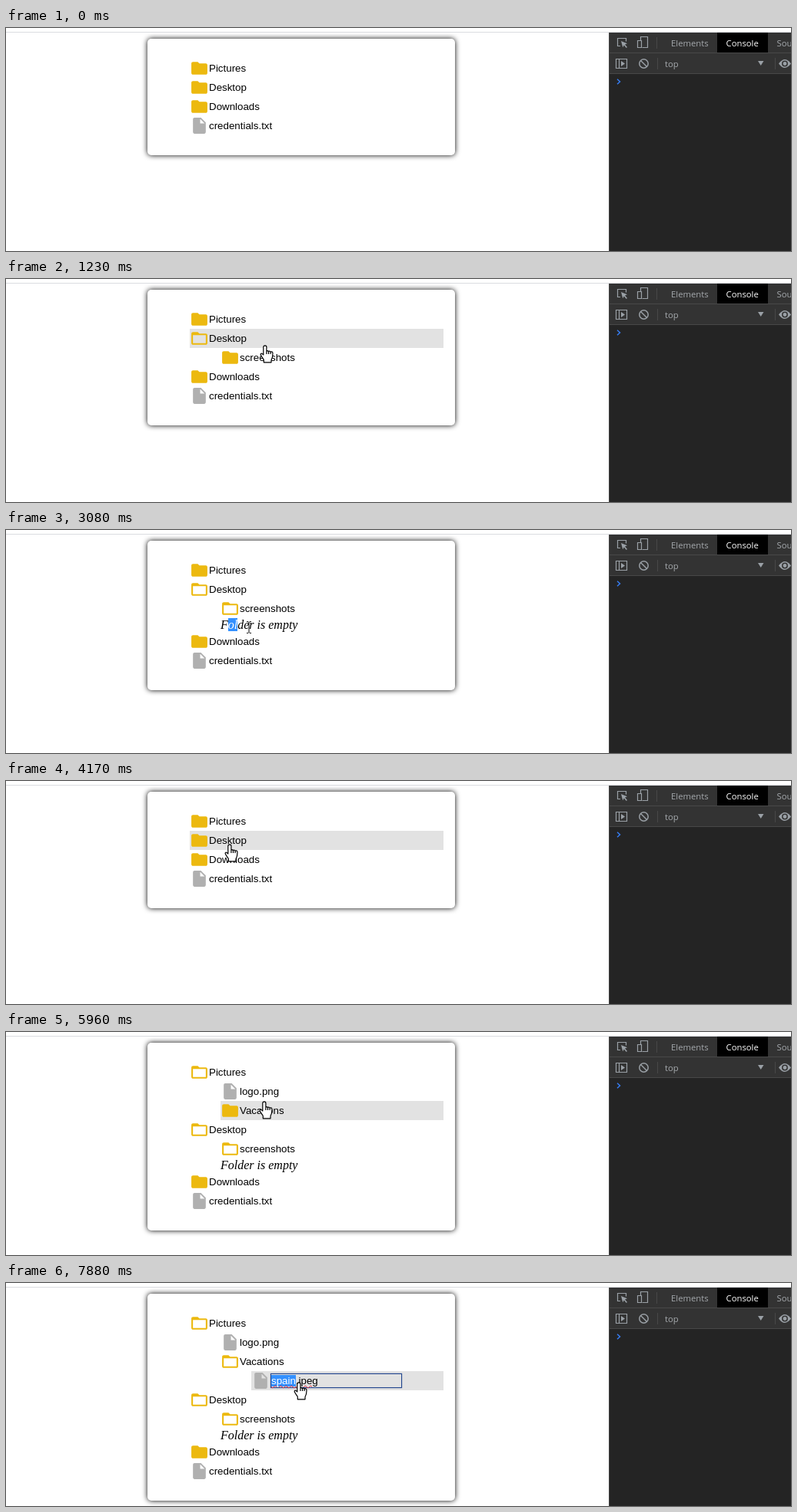
Animation of 1021x291 px, one loop 8000 ms. Source, as an HTML page:

```html
<!DOCTYPE html>
<html lang="en">
<head>
<meta charset="utf-8">
<title>File tree</title>
<style>
html, body { margin: 0; width: 100%; height: 100%; overflow: hidden; background: #fff; }
body { position: relative; font: 13.333px/25px "Liberation Sans", Arial, sans-serif; color: #000; }
[hidden] { display: none !important; }
.rule { position: absolute; top: 5px; left: 0; width: 100%; height: 1px; background: #dadce0; }
.card { position: absolute; left: 184px; top: 14px; width: 400px; box-sizing: border-box;
  padding: 26px 15px 26px 55px; border-radius: 5px; background: #fff; box-shadow: 0 0 7px #000; }
.kids { padding-left: 40px; }
.row { position: relative; height: 25px; white-space: nowrap; }
.row.hover { background: #e2e2e2; }
.row svg { position: absolute; left: 0; top: 0; width: 25px; height: 25px; }
.row .label { position: absolute; left: 25px; top: 0; }
.folder { fill: #ecb90f; }
.file { fill: #b0b0b0; }
.empty { height: 18px; font: italic 16px/18px "Liberation Serif", "Times New Roman", serif; }
.empty span { display: inline-block; height: 18px; width: max-content; }
.sel { background: #3390ff; color: #fff; }
.field { position: absolute; left: 25px; top: 3px; width: 171px; height: 19px; box-sizing: border-box;
  border: 1px solid #24478f; box-shadow: 0 0 1px #24478f; line-height: 17px; }
.field u { text-decoration: underline wavy #e0202f 1px; text-underline-offset: 1px; }
.menu { position: absolute; left: 348px; top: 112px; width: 96px; height: 63px; box-sizing: border-box;
  padding: 5px; border-radius: 5px; background: #fff; box-shadow: 0 0 7px #000; }
.menu .row { height: 26.5px; line-height: 26px; padding-left: 8px; }
.tools { position: absolute; left: 784px; top: 6px; width: 237px; height: 285px; }
.tools text { font: 11.3px "Open Sans", "Noto Sans", sans-serif; fill: #a5a9ad; }
.pointer { position: absolute; left: 0; top: 0; width: 20px; height: 26px; overflow: visible; }
.pointer path { fill: #fff; stroke: #000; stroke-linejoin: round; }
#beam path { fill: none; }
</style>
</head>
<body>
<div class="rule"></div>
<div class="card" id="card"></div>
<div class="menu" id="menu"><div class="row">Rename</div><div class="row">Delete</div></div>

<svg class="tools" viewBox="784 6 237 285">
  <path fill="#242424" d="M784 6h237v285H784z"/>
  <path fill="#333" d="M785 6h236v53H785z"/>
  <path fill="#000" d="M925 6h66v26h-66z"/>
  <path stroke="#484848" fill="none" d="M785 32.5h236M785 59.5h236M846.5 12v15M847.5 39v15M1000.5 39v15M784.5 6v285"/>
  <g fill="none" stroke="#9aa0a6" stroke-width="1.2">
    <path d="M799 23.5h-3.5v-10h11v4"/>
    <path fill="#9aa0a6" stroke="none" d="M800 17l8 3.2-3 1.4 3 3.4-1.2 1-3-3.4-1.6 2.6z"/>
    <path d="M825.5 16v-4.5h9v14h-7M821.500 16.500h5v9h-5z"/>
    <path d="M793.500 40.500h14v12h-14zM797.500 40.500v12"/>
    <path fill="#9aa0a6" stroke="none" d="M800 43l5 3.500-5 3.500z"/>
    <circle cx="829.500" cy="46.500" r="5.700" stroke-width="1.500"/>
    <path stroke-width="1.500" d="M825.500 42.500l8 8"/>
  </g>
  <path fill="#9aa0a6" d="M978 43h7.500l-3.750 6z"/>
  <path fill="#9aa0a6" d="M1005 46.500q8-11 16 0q-8 11-16 0z"/>
  <circle cx="1013" cy="46.500" r="3.200" fill="#9aa0a6" stroke="#333" stroke-width="1.500"/>
  <path fill="none" stroke="#367cf1" stroke-width="1.500" d="M795 66.800l3.500 3.200-3.500 3.200"/>
  <text x="865" y="24">Elements</text>
  <text x="936.500" y="24" style="fill:#fff">Console</text>
  <text x="1002.500" y="24">Sources</text>
  <text x="857" y="51">top</text>
</svg>

<svg class="pointer" id="arrow"><path d="M.5 .5V16.500L4.200 13 6.800 19 9.200 18 6.600 12.200H11.800Z"/></svg>
<svg class="pointer" id="hand"><g transform="translate(-6.500 -1)"><path stroke-width="1.200" d="M6.500 .8C5 .8 4.300 1.600 4.300 3V13L2.800 11.600C1.800 10.700 .6 11.200 .6 12.400 1 14.500 3 16.500 4.800 19.500V22.800H14.500V19.800C15.800 17.500 16.400 15.500 16.400 12.500V10.400C16.400 8.600 14 8.400 13.600 9.600 13.400 8 11 7.600 10.800 9 10.500 7.400 8.600 7.200 8.400 8.500V3C8.400 1.600 8 .8 6.500 .8ZM8.400 8.500V12M11 9V12M13.600 9.600V12"/></g></svg>
<svg class="pointer" id="beam"><path d="M-3-7.500H-1L0-6.500 1-7.500H3M0-6.500V6.500M-3 7.500H-1L0 6.500 1 7.500H3"/></svg>

<script>
const LOOP = 8000, STEP = 77.2;
const $ = id => document.getElementById(id);

const shapes = {
  closed: 'M10 4H4c-1.100 0-2 .9-2 2v12c0 1.100.9 2 2 2h16c1.100 0 2-.9 2-2V8c0-1.100-.9-2-2-2h-8l-2-2z',
  open: 'M20 6h-8l-2-2H4c-1.100 0-2 .9-2 2v12c0 1.100.9 2 2 2h16c1.100 0 2-.9 2-2V8c0-1.100-.9-2-2-2zm0 12H4V8h16v10z',
  file: 'M6 2c-1.100 0-2 .9-2 2v16c0 1.100.9 2 2 2h12c1.100 0 2-.9 2-2V8l-6-6H6zm7 7V3.500L18.500 9H13z'
};

const tree = [
  ['Pictures', [['logo.png'], ['Vacations', [['spain.jpeg']]]]],
  ['Desktop', [['screenshots', []]]],
  ['Downloads', []],
  ['credentials.txt']
];

// When each folder is open, as [from, to) spans
const openSpans = {
  Pictures: [[5270, LOOP]],
  Vacations: [[6200, LOOP]],
  Desktop: [[950, 4100], [4560, LOOP]],
  screenshots: [[1550, LOOP]],
  Downloads: []
};

// Pointer stops: time, x, y
const stops = [
  [70, 744, 244], [400, 545, 148], [760, 344, 78], [830, 337, 73], [1150, 337, 73],
  [1225, 337, 87], [1375, 335, 105], [1800, 335, 105], [2300, 284, 122],
  [2380, 278, 121], [2600, 289, 122], [2800, 301, 124], [3070, 316, 127],
  [3160, 316, 127], [3230, 321, 130], [3380, 305, 122], [3640, 305, 122],
  [4000, 291, 83], [4240, 291, 83], [4480, 301, 76], [4880, 301, 76],
  [4950, 301, 66], [5050, 301, 66], [5260, 310, 54], [5580, 310, 54],
  [5930, 336, 91], [6100, 337, 98], [6340, 337, 98], [6790, 352, 117],
  [7260, 352, 117], [7640, 381, 130]
];

const within = (t, spans) => spans.some(([a, b]) => t >= a && t < b);

function add(parent, cls, html = '') {
  const el = document.createElement('div');
  el.className = cls;
  el.innerHTML = html;
  return parent.appendChild(el);
}

const folders = [];
function build(parent, nodes) {
  for (const [name, kids] of nodes) {
    const row = add(parent, 'row',
      `<svg viewBox="0 0 24 24" class="${kids ? 'folder' : 'file'}"><path d="${shapes[kids ? 'closed' : 'file']}"/></svg>` +
      `<span class="label">${name}</span>`);
    if (name === 'spain.jpeg')
      row.insertAdjacentHTML('beforeend', '<div class="field" id="field"><u><span class="sel">spain</span>.jpeg</u></div>');
    if (!kids) continue;
    const box = add(parent, kids.length ? 'kids' : 'kids none');
    folders.push({ name, box, icon: row.querySelector('path') });
    if (kids.length) build(box, kids);
    else {
      box.style.padding = 0;
      add(box, 'empty', 'F<b style="font-weight:400">o</b><b style="font-weight:400">l</b>der is empty');
    }
  }
}
build($('card'), tree);

const rows = [...document.querySelectorAll('.row')];
const notes = [...document.querySelectorAll('.empty')];
const letters = [...notes[0].querySelectorAll('b')];
const label = $('field').previousElementSibling;

function pointerAt(t) {
  const i = stops.findIndex(s => s[0] > t);
  if (i < 0) return stops[stops.length - 1].slice(1);
  if (i === 0) return stops[0].slice(1);
  const [t0, x0, y0] = stops[i - 1], [t1, x1, y1] = stops[i];
  const k = (t - t0) / (t1 - t0);
  return [x0 + (x1 - x0) * k, y0 + (y1 - y0) * k];
}

function hit(el, x, y) {
  const r = el.getBoundingClientRect();
  return x >= r.left && x < r.right && y >= r.top && y < r.bottom;
}

const show = (el, on) => el.toggleAttribute('hidden', !on);

function render(t) {
  for (const { name, box, icon } of folders) {
    const open = within(t, openSpans[name]);
    show(box, open);
    icon.setAttribute('d', shapes[open ? 'open' : 'closed']);
  }
  show($('menu'), t >= 7040 && t < 7800);
  show($('field'), t >= 7800);
  show(label, t < 7800);
  letters.forEach((el, i) => el.classList.toggle('sel', t >= 2690 + 80 * i && t < 3240));

  const tick = Math.floor((t + 10) / STEP) * STEP - 10;
  const [x, y] = pointerAt(tick).map(Math.round);
  const visible = t >= 70;
  let kind = 'arrow';
  for (const row of rows) {
    const over = visible && hit(row, x, y);
    row.classList.toggle('hover', over);
    if (over) kind = 'hand';
  }
  if (notes.some(n => hit(n, x, y))) kind = 'beam';
  for (const id of ['arrow', 'hand', 'beam']) {
    show($(id), visible && id === kind);
    $(id).style.transform = `translate(${x}px, ${y}px)`;
  }
}

const start = performance.now();
function loop() {
  render((performance.now() - start) % LOOP);
  requestAnimationFrame(loop);
}
render(0);
requestAnimationFrame(loop);
</script>
</body>
</html>
```
